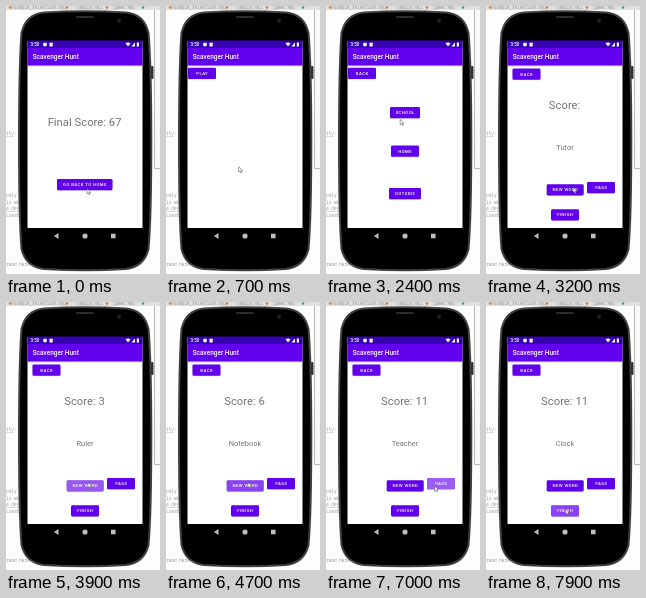
These frames come from a looping animation (154 by 268 pixels, 8 s). An HTML page:

```html
<!DOCTYPE html>
<html lang="en">
<head>
<meta charset="utf-8">
<title>Word game on a phone</title>
<style>
html, body { margin: 0; width: 100%; height: 100%; overflow: hidden; background: #fff; }
svg { display: block; width: 100vw; height: 100vh; }
text { font-family: Roboto, sans-serif; }
.code text { font: 4.4px "Noto Sans Mono", monospace; fill: #999; }
.btn text { font-size: 4.3px; font-weight: 500; letter-spacing: .4px; fill: #fff; text-anchor: middle; }
.big { font-size: 11.3px; fill: #757575; text-anchor: middle; }
.word { font-size: 7.5px; fill: #757575; text-anchor: middle; }
</style>
</head>
<body>
<svg viewBox="0 0 154 268">
  <defs>
    <linearGradient id="shade" x1="0" y1="0" x2="0" y2="1">
      <stop offset="0" stop-opacity=".2"/>
      <stop offset="1" stop-opacity="0"/>
    </linearGradient>
  </defs>

  <!-- desktop behind the phone -->
  <rect width="154" height="268" fill="#fdfdfd"/>
  <rect width="154" height="4" fill="#e3dfdc"/>
  <g class="code">
    <text x="5" y="3">example_selection.xml</text>
    <text x="70" y="3">sample.xml</text>
    <text x="108" y="3">game.xml</text>
    <text x="0" y="129">ity:</text>
    <text x="0" y="191">only :</text>
    <text x="0" y="197.500">is wit</text>
    <text x="0" y="204">a devi</text>
    <text x="0" y="210.500">creat</text>
    <text x="0" y="260">read here</text>
  </g>
  <path d="M0 130.500H8M0 205.500H14" stroke="#bbb" stroke-width=".5"/>
  <g fill="#d9824f">
    <circle cx="4" cy="1.500" r="1.300"/><circle cx="61" cy="1.500" r="1.300"/><circle cx="101" cy="1.500" r="1.300"/>
    <circle cx="137" cy="1.500" r="1.300" fill="#3aa69b"/>
  </g>
  <rect x="148" y="4" width="6" height="158" fill="#f8f8f8"/>
  <path d="M148.500 4V162.500H154" fill="none" stroke="#aaa" stroke-width=".8"/>

  <!-- phone -->
  <rect x="145" y="60" width="2.500" height="13" rx="1" fill="#333"/>
  <path d="M38 6.500Q79 4 120 6.500Q138 8 142.500 27Q145.300 60 145.300 136T142.500 243Q138 261 120 263Q79 265.500 38 263Q20 261 15.500 243Q13 212 13 136T15.500 27Q20 8 38 6.500Z" fill="#000" stroke="#3e4042" stroke-width="2"/>
  <rect x="70" y="10" width="18" height="2" rx="1" fill="#2b2b2b"/>
  <circle cx="113" cy="15" r="2" fill="#222"/>
  <rect x="21.500" y="35" width="115" height="187" fill="#fff"/>
  <rect x="21.500" y="34.500" width="115" height="7.500" fill="#3700b3"/>
  <rect x="21.500" y="42" width="115" height="17.500" fill="#6200ee"/>
  <rect x="21.500" y="59.500" width="115" height="1.500" fill="url(#shade)"/>
  <text x="24.500" y="40.300" font-size="4.500" font-weight="500" fill="#fff">3:50</text>
  <text x="26.700" y="53.300" font-size="6.500" font-weight="500" fill="#fff">Scavenger Hunt</text>
  <g fill="#fff">
    <circle cx="39" cy="38.500" r="1.900"/>
    <rect x="43.500" y="36.700" width="3.200" height="3.700" rx=".5"/>
    <path d="M119.500 37.200Q122 35.700 124.500 37.200L122 40.500ZM129 36.500V40.500H125.300ZM130.800 36.800H131.400V36.300H132.400V36.800H133V40.500H130.800Z"/>
  </g>
  <g fill="#bbb">
    <path d="M52.500 227V233L47.800 230Z"/>
    <circle cx="79" cy="230" r="2.600"/>
    <rect x="105" y="227.700" width="4.600" height="4.600"/>
  </g>

  <g id="app"></g>
  <path id="cursor" d="M0 0V5.200L1.300 4.100L2.100 6L3 5.600L2.200 3.800H3.900Z" fill="#fff" stroke="#444" stroke-width=".5"/>
</svg>
<script>
const LOOP = 8000, STEP = 100;
const $ = id => document.getElementById(id);
const app = $('app');

const button = (id, label, x, y, w) => {
  const box = (dy, rest) => `<rect x="${x}" y="${y + dy}" width="${w}" height="11.2" rx="1.3" ${rest}/>`;
  return `<g class="btn">${box(.6, 'opacity=".15"')}${box(0, 'fill="#6200ee"')}
    ${box(0, `id="${id}" fill="#fff" opacity="0"`)}
    <text x="${x + w / 2 + .2}" y="${y + 7.2}">${label}</text></g>`;
};

const screens = [
  { from: 0, body: '<text class="big" x="78.6" y="119.7">Final Score: 67</text>' +
      button('home', 'GO BACK TO HOME', 51, 173, 55.5) },
  { from: 500, body: button('play', 'PLAY', 22, 61.8, 28) },
  { from: 1700, body: button('back1', 'BACK', 22, 61.8, 28) +
      button('school', 'SCHOOL', 64, 101, 30) +
      button('place', 'HOME', 65, 139.5, 28) +
      button('outside', 'OUTSIDE', 63, 182, 32) },
  { from: 2700, body: '<text class="big" id="score" x="78.6" y="102.7"></text>' +
      '<text class="word" id="word" x="79" y="144.2"></text>' +
      button('back2', 'BACK', 26.5, 62.5, 28) +
      button('next', 'NEW WORD', 60.7, 178.2, 37) +
      button('pass', 'PASS', 101, 176, 28) +
      button('finish', 'FINISH', 65, 203.2, 28) }
];
app.innerHTML = screens.map(s => `<g>${s.body}</g>`).join('');

const words = ['Tutor', 'Pencil', 'Eraser', 'Ruler', 'Backpack', 'Stapler', 'Notebook', 'Desk',
  'Marker', 'Textbook', 'Globe', 'Subject dividers', 'Scissors', 'Calculator', 'Teacher', 'Clock'];

const every = (start, gap, n) => Array.from({ length: n }, (_, i) => start + i * gap);
const clicks = {
  home: [300], play: [1500], school: [2500],
  next: every(3400, 240, 11), pass: every(6600, 200, 4), finish: [7800]
};

// time, x, y
const path = [[0, 81, 182.7], [500, 81, 182.7], [1200, 39.2, 72.3], [1700, 39.2, 72.3],
  [2300, 74.2, 113.5], [2700, 74.2, 113.5], [3200, 87.2, 181.5], [3800, 82, 180.5],
  [5700, 82, 180.5], [5900, 99, 188], [6400, 108.5, 184], [7300, 108.5, 184],
  [7700, 79.5, 207], [8000, 79.5, 207]];

function pointer(t) {
  const i = path.findIndex(p => p[0] > t);
  const [a, b] = [path[i - 1], path[i]];
  const u = (t - a[0]) / (b[0] - a[0]), e = u * u * (3 - 2 * u);
  return [a[1] + (b[1] - a[1]) * e, a[2] + (b[2] - a[2]) * e];
}

function draw() {
  const t = Math.floor((performance.now() - start) % LOOP / STEP) * STEP;
  const past = id => clicks[id].filter(c => c <= t);

  const current = screens.findLastIndex(s => s.from <= t);
  [...app.children].forEach((g, i) => g.style.display = i === current ? '' : 'none');

  for (const id in clicks) {
    const age = t - (past(id).pop() ?? -LOOP);
    $(id).setAttribute('opacity', .36 * Math.max(0, 1 - age / 350));
  }

  const points = past('next').length;
  $('score').textContent = points ? 'Score: ' + points : 'Score:';
  $('word').textContent = words[points + past('pass').length];
  $('cursor').setAttribute('transform', `translate(${pointer(t)})`);
  requestAnimationFrame(draw);
}
const start = performance.now();
draw();
</script>
</body>
</html>
```
